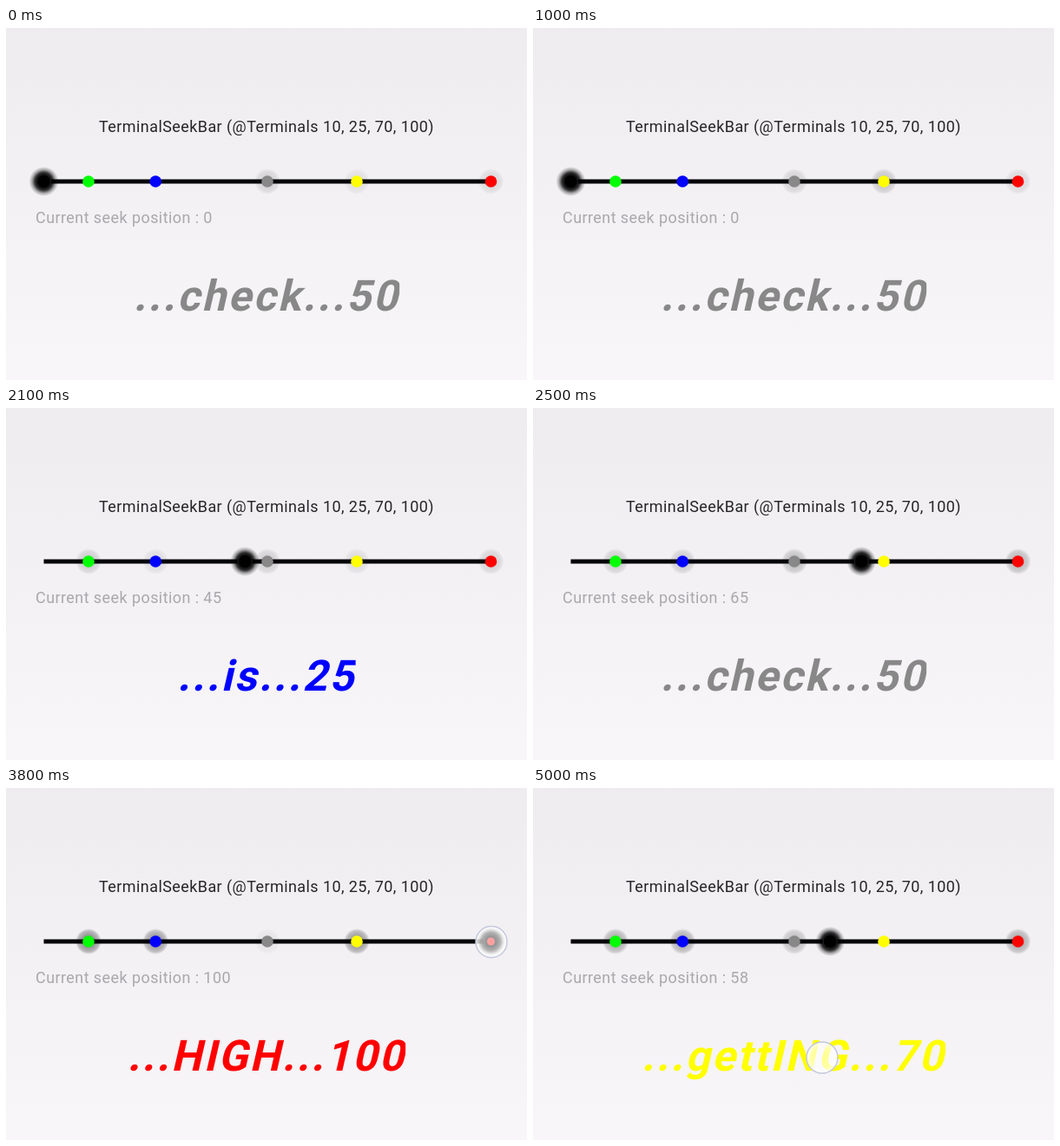
Animation, 600 px wide and 406 px high, one loop 5.1 s. Source, as an HTML page:

```html
<!DOCTYPE html>
<html lang="en">
<head>
<meta charset="utf-8">
<style>
  html, body { margin: 0; width: 100%; height: 100%; overflow: hidden; background: #f2f0f3; }
  svg { display: block; width: 600px; height: 406px; }
  text { font: 18px Roboto, sans-serif; letter-spacing: .42px; white-space: pre; }
  #label { font-size: 49.5px; font-weight: 700; letter-spacing: 2.35px; }
</style>
</head>
<body>
<svg id="stage" viewBox="0 0 600 406">
  <defs>
    <linearGradient id="back" x2="0" y2="1">
      <stop offset="0" stop-color="#eeecef"/>
      <stop offset="1" stop-color="#f8f6f9"/>
    </linearGradient>
    <radialGradient id="shade">
      <stop offset=".45" stop-color="#000"/>
      <stop offset=".62" stop-color="#000" stop-opacity=".75"/>
      <stop offset=".8" stop-color="#000" stop-opacity=".3"/>
      <stop offset="1" stop-color="#000" stop-opacity="0"/>
    </radialGradient>
    <radialGradient id="glow">
      <stop offset=".4" stop-color="#000" stop-opacity=".5"/>
      <stop offset=".8" stop-color="#000" stop-opacity=".3"/>
      <stop offset="1" stop-color="#000" stop-opacity="0"/>
    </radialGradient>
    <radialGradient id="glass">
      <stop offset="0" stop-color="#fff" stop-opacity=".55"/>
      <stop offset=".7" stop-color="#fff" stop-opacity=".65"/>
      <stop offset="1" stop-color="#fff" stop-opacity=".9"/>
    </radialGradient>
    <clipPath id="bounds"><rect id="boundsRect" y="270" height="80"/></clipPath>
  </defs>
  <rect width="600" height="406" fill="url(#back)"/>
  <text x="300" y="119.5" text-anchor="middle" fill="#262528">TerminalSeekBar (@Terminals 10, 25, 70, 100)</text>
  <rect x="43.5" y="174.5" width="515" height="5" fill="#050509"/>
  <g id="terminals"></g>
  <g id="thumb">
    <circle r="17" fill="url(#shade)"/>
    <circle r="8" fill="none" stroke="#222"/>
    <circle id="core" r="4.5" fill="#f22"/>
  </g>
  <text id="status" x="34" y="224.5" fill="#a9a8ab"></text>
  <g clip-path="url(#bounds)">
    <text id="label" text-anchor="middle" transform="translate(300 326) skewX(-13)"></text>
  </g>
  <g id="touch">
    <circle r="18" fill="url(#glass)" stroke="#c4c8dc" stroke-width="1.5"/>
  </g>
</svg>
<script>
const LOOP = 5100, STEP = 100;
const $ = id => document.getElementById(id);
const barX = value => 43.5 + value * 5.15;

const glowTimes = [0, 1000, 1600, 2500, 3200, 3800, 5000];
const terminals = [
  { at: 10,  color: '#0f0', text: '...this...10',    glow: [0, 0, .3, .3, .5, .8, .55] },
  { at: 25,  color: '#00f', text: '...is...25',      glow: [0, 0, 0, .3, .45, .7, .55] },
  { at: 50,  color: '#888', text: '...check...50',   glow: [.25, .25, .12, .4, .5, .1, .4] },
  { at: 70,  color: '#ff0', text: '...gettING...70', glow: [.15, .35, .4, 0, 0, .7, 0] },
  { at: 100, color: '#f00', text: '...HIGH...100',   glow: [.2, .2, 0, .45, .5, .5, .55] }
];
const [, , check, getting, high] = terminals;

const seekTimes = [0, 1170, 1600, 2500, 3200, 3250, 4050, 5000];
const seekValues = [0, 0, 21, 65, 98, 100, 100, 58];
const turnTime = 4000, touchTime = 3700;

function track(times, values, t) {
  const i = times.findIndex(time => time > t);
  if (i < 0) return values[values.length - 1];
  const k = (t - times[i - 1]) / (times[i] - times[i - 1]);
  return values[i - 1] + (values[i] - values[i - 1]) * k;
}

function circle(x, r, fill) {
  const node = document.createElementNS('http://www.w3.org/2000/svg', 'circle');
  const attrs = { cx: x, cy: 177, r, fill };
  for (const name in attrs) node.setAttribute(name, attrs[name]);
  return $('terminals').appendChild(node);
}

for (const terminal of terminals) {
  terminal.halo = circle(barX(terminal.at), 15, 'url(#glow)');
  circle(barX(terminal.at), 6.8, terminal.color);
}

const place = (id, x, y) => $(id).setAttribute('transform', `translate(${x} ${y})`);
const show = (id, on) => $(id).setAttribute('visibility', on ? 'visible' : 'hidden');

// The label names the terminal crossed last, in either direction.
function lastCrossed(seek, t) {
  if (t >= turnTime) return seek <= getting.at ? getting : high;
  return terminals.filter(({ at }) => at <= seek).pop() || check;
}

// The slanted text is cut off at its upright width.
function setLabel({ text, color }) {
  const label = $('label');
  label.textContent = text;
  label.setAttribute('fill', color);
  const width = label.getComputedTextLength();
  $('boundsRect').setAttribute('x', 300 - width / 2);
  $('boundsRect').setAttribute('width', width);
}

function draw(t) {
  const seek = Math.round(track(seekTimes, seekValues, t));
  for (const { halo, glow } of terminals)
    halo.setAttribute('opacity', track(glowTimes, glow, t));

  place('thumb', barX(seek), 177);
  show('core', seek === 100);
  $('status').textContent = `Current seek position : ${seek}`;
  setLabel(lastCrossed(seek, t));

  const drag = Math.max(0, (t - turnTime) / 1000);
  place('touch', 559 - 226 * drag, 177.5 + 133.5 * drag);
  show('touch', t >= touchTime);
}

function tick() {
  const t = performance.now() % LOOP;
  draw(Math.floor(t / STEP) * STEP);
  requestAnimationFrame(tick);
}
tick();
</script>
</body>
</html>
```
